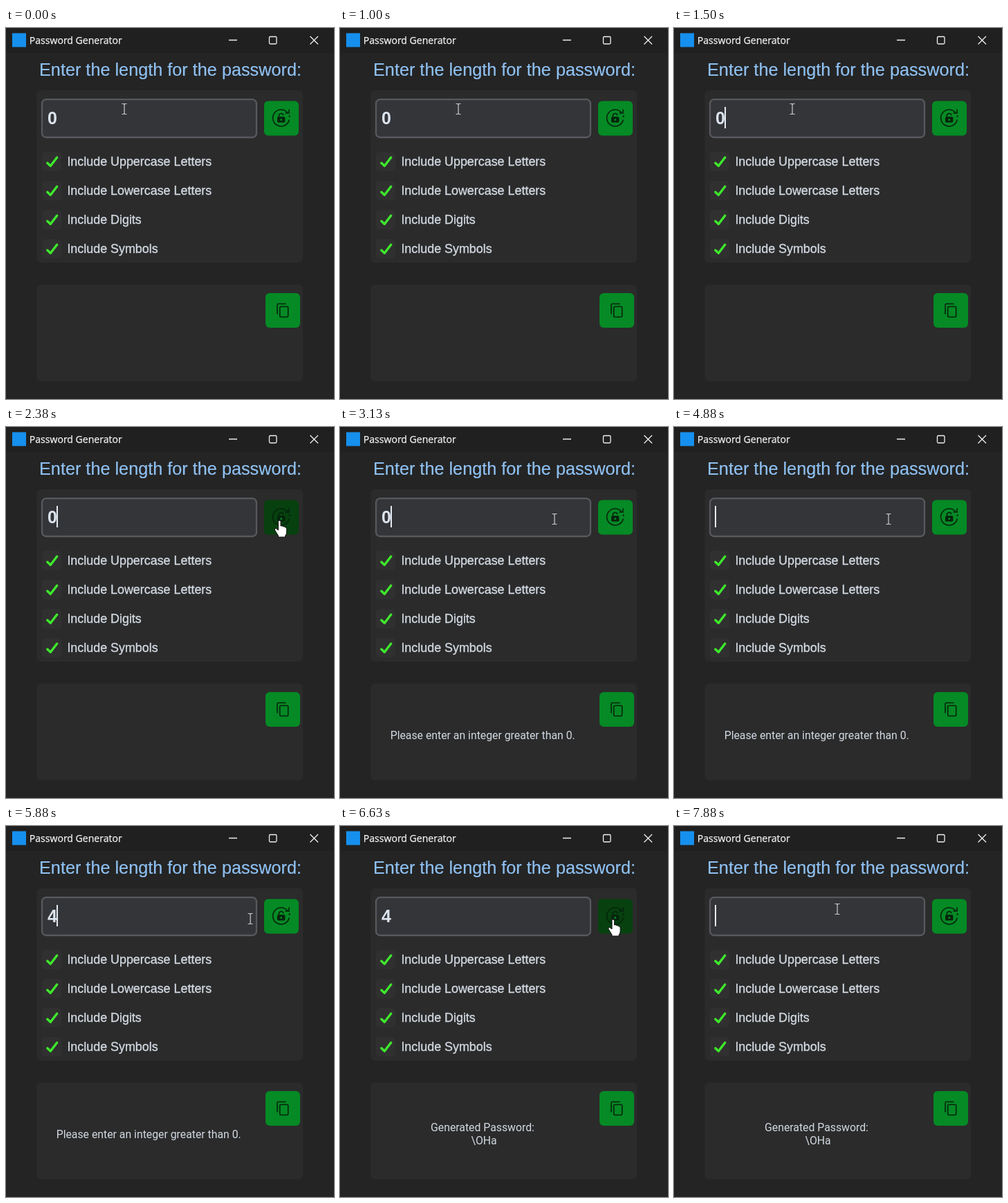
An HTML page for the animation above (8 s loop, 474 by 536 pixels).

```html
<!DOCTYPE html>
<html lang="en">
<head>
<meta charset="utf-8">
<title>Password Generator</title>
<style>
  html, body { margin: 0; height: 100%; overflow: hidden; background: #242424; }
  svg { display: block; width: 474px; height: 536px; }
  text { font-family: "Liberation Sans", Arial, sans-serif; fill: #d2d9e2; }
  .title { font: 14.05px "Open Sans", sans-serif; fill: #f4f4f4; stroke: #f4f4f4; stroke-width: .25; }
  .heading { font-size: 25.25px; fill: #8fc1f2; stroke: #8fc1f2; stroke-width: .2; }
  .label { font-size: 17.9px; stroke: #d2d9e2; stroke-width: .35; }
  .entry { font-size: 25px; font-weight: bold; fill: #dce4ee; }
  .message { font: 15.8px Roboto, sans-serif; text-anchor: middle; }
  .panel { fill: #2b2b2b; }
  .button { fill: #058a25; }
  .button.hover { fill: #06410f; }
  .line { fill: none; stroke: #f0f0f0; stroke-width: 1.3; }
  .icon { fill: none; stroke: #06240c; stroke-width: 1.6; }
  .check { fill: none; stroke: #3eea2c; stroke-width: 3.4; stroke-linecap: round; stroke-linejoin: round; }
</style>
</head>
<body>
<svg viewBox="0 0 474 536">
  <rect width="474" height="536" fill="#242424"/>
  <rect width="474" height="36" fill="#202020"/>
  <rect x="9" y="7.5" width="20" height="20" fill="#1690ee"/>
  <text class="title" x="33.8" y="23">Password Generator</text>
  <path class="line" d="M322 17.5h12M439.5 12l11.5 11.5m0-11.5l-11.5 11.5"/>
  <rect class="line" x="380.5" y="12.5" width="10.5" height="10.5" rx="1.5"/>

  <text class="heading" x="48" y="69">Enter the length for the password:</text>
  <rect class="panel" x="44.5" y="90" width="384.5" height="249" rx="6"/>
  <rect class="panel" x="44.5" y="370.5" width="384.5" height="140" rx="6"/>

  <rect x="52" y="103.2" width="310" height="54.8" rx="6" fill="#343539" stroke="#56595e" stroke-width="2.3"/>
  <text class="entry" id="entry" x="60" y="139"></text>
  <rect id="caret" y="114" width="2" height="31" fill="#e4eaf0"/>

  <rect class="button" id="generate" x="373" y="105.5" width="50" height="50" rx="6"/>
  <g class="icon">
    <path d="M407 122.5A12 12 0 1 0 409.3 132.5M409 117.5v5.5h-5.5M409.6 126v3"/>
    <path d="M394.4 129v-2.2a3.3 3.3 0 0 1 6.5-.8"/>
    <rect x="392" y="128.3" width="11.3" height="8.2" rx="1.5" fill="#06240c" stroke="none"/>
    <circle cx="397.7" cy="132.4" r="1.5" fill="#058a25" stroke="none"/>
  </g>

  <rect class="button" x="375" y="383" width="50" height="50" rx="6"/>
  <g class="icon">
    <rect x="395.7" y="402.5" width="12" height="15" rx="1.5"/>
    <path d="M392 413.5v-13.5q0-1.5 1.5-1.5h11"/>
  </g>

  <g id="options"></g>
  <g id="output"></g>

  <path id="beam" fill="none" stroke="#c9ccd0" stroke-width="1.2"
    d="M-3.5-7.5h2.5l1 1 1-1h2.5M0-6.5v13M-3.5 7.5h2.5l1-1 1 1h2.5"/>
  <path id="hand" fill="#fff" stroke="#111" stroke-width="1"
    d="M-2.5 1.5Q-2.5 0-.8 0T1 1.5V8q3-1 3.4 1 2.6-.8 3 1 2.2-.2 2.2 2v5q0 3-2 5v2H-2.5v-2L-7.5 14q-.8-2.6 1.6-2.6L-2.5 14z"/>
</svg>
<script>
const LOOP = 8000;
const $ = id => document.getElementById(id);

$('options').innerHTML = ['Uppercase Letters', 'Lowercase Letters', 'Digits', 'Symbols']
  .map((name, i) => `<g transform="translate(0 ${i * 42})">
    <rect x="52" y="179" width="28" height="28" rx="5" fill="#303030"/>
    <path class="check" d="M59.8 195l4.5 4.3 9.4-12.3"/>
    <text class="label" x="88.4" y="198.5">Include ${name}</text></g>`).join('');

// [time, x, y] of the pointer's hot spot
const pointer = [
  [0, 171, 117], [1750, 171, 117], [2300, 396, 135], [2650, 396, 135], [3080, 310, 133],
  [5700, 310, 133], [6060, 395.5, 135], [6680, 395.5, 135], [6980, 236, 120], [LOOP, 236, 120]
];
// [time, value] steps
const typed = [[0, '0'], [4060, ''], [5250, '4'], [7600, '']];
// lines of text as [content, x, y]
const output = [
  [0, []],
  [2620, [['Please enter an integer greater than 0.', 206.2, 451.3]]],
  [6600, [['Generated Password:', 206, 441.3], ['\\OHa', 208, 460.3]]]
];
const caretOff = [[0, 130], [880, 1200], [1780, 2080], [2680, 2980], [3620, 3870],
  [4490, 4870], [6360, 6660], [7240, 7490]];

const stepAt = (steps, t) => steps.filter(s => s[0] <= t).pop()[1];

function pointerAt(t) {
  const i = pointer.findIndex(p => p[0] > t);
  const [t0, x0, y0] = pointer[i - 1], [t1, x1, y1] = pointer[i];
  const k = (t - t0) / (t1 - t0), e = k * k * (3 - 2 * k);
  return [x0 + (x1 - x0) * e, y0 + (y1 - y0) * e];
}

let shown;
function frame(now) {
  const t = now % LOOP;
  const [x, y] = pointerAt(t);
  const over = x >= 373;
  for (const id of ['beam', 'hand']) {
    $(id).setAttribute('transform', `translate(${x} ${y})`);
    $(id).style.display = (id === 'hand') === over ? '' : 'none';
  }
  $('generate').classList.toggle('hover', over);

  const value = stepAt(typed, t);
  $('entry').textContent = value;
  $('caret').setAttribute('x', value ? 73 : 59);
  $('caret').style.display = caretOff.some(([a, b]) => t >= a && t < b) ? 'none' : '';

  const lines = stepAt(output, t);
  if (lines !== shown) {
    shown = lines;
    $('output').innerHTML = lines
      .map(([content, lx, ly]) => `<text class="message" x="${lx}" y="${ly}">${content}</text>`).join('');
  }
  requestAnimationFrame(frame);
}
requestAnimationFrame(frame);
</script>
</body>
</html>
```
